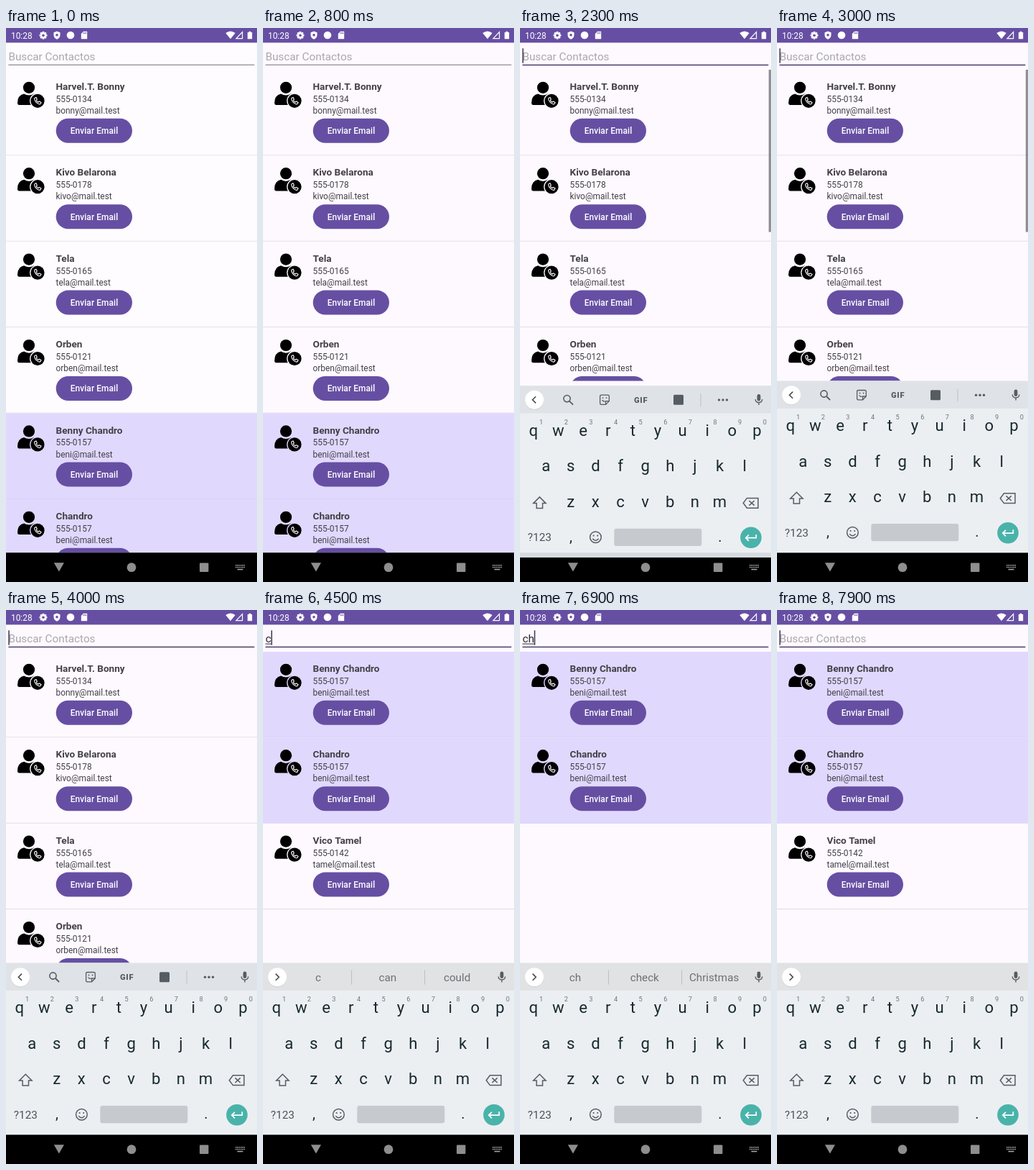
Animation, 350 px wide and 770 px high, one loop 8000 ms. Source, as an HTML page with a canvas:

```html
<!DOCTYPE html>
<html lang="es">
<head>
<meta charset="utf-8">
<title>Contactos</title>
<style>
html, body { margin: 0; width: 100%; height: 100%; overflow: hidden; background: #000; }
canvas { display: block; width: 350px; height: 770px; }
</style>
</head>
<body>
<canvas id="stage"></canvas>
<script>
const W = 350, H = 770, LOOP = 8000, TICK = 100;
const canvas = document.getElementById('stage');
const ratio = window.devicePixelRatio || 1;
canvas.width = W * ratio;
canvas.height = H * ratio;
const g = canvas.getContext('2d');

const PURPLE = '#664fa3', LAVENDER = '#e1d8fe', INK = '#434046', KEY = '#17292f', ICON = '#555c62';
const ROW = 119.4, LIST_TOP = 58, KB_TOP = 490.6, NAV_TOP = 729.2, RISE = 6.6;

const contacts = [
  ['Harvel.T. Bonny', '555-0134', 'bonny'],
  ['Kivo Belarona', '555-0178', 'kivo'],
  ['Tela', '555-0165', 'tela'],
  ['Orben', '555-0121', 'orben'],
  ['Benny Chandro', '555-0157', 'beni', true],
  ['Chandro', '555-0157', 'beni', true],
  ['Vico Tamel', '555-0142', 'tamel']
];

// Each edit restarts the caret blink; hints may follow a little later.
const edits = [
  { at: 2000, text: '', filter: '' },
  { at: 4500, text: 'c', filter: 'c' },
  { at: 4900, text: 'ch', filter: 'ch' },
  { at: 7300, text: 'c', filter: 'c' },
  { at: 7800, text: '', filter: 'c' }
];
const hints = [
  { at: 4500, words: ['c', 'can', 'could'] },
  { at: 4900, words: ['ch', 'check', 'Christmas'] },
  { at: 7400, words: ['c', 'can', 'could'] },
  { at: 7900, words: [] }
];
const latest = (list, t) => list.filter(e => e.at <= t).pop();

function rect(x, y, w, h, color) {
  g.fillStyle = color;
  g.fillRect(x, y, w, h);
}
function pill(x, y, w, h, r, color) {
  g.fillStyle = color;
  g.beginPath();
  g.roundRect(x, y, w, h, r);
  g.fill();
}
function disc(x, y, r, color) {
  g.fillStyle = color;
  g.beginPath();
  g.arc(x, y, r, 0, Math.PI * 2);
  g.fill();
}
function ring(x, y, r, color, width) {
  g.strokeStyle = color;
  g.lineWidth = width;
  g.beginPath();
  g.arc(x, y, r, 0, Math.PI * 2);
  g.stroke();
}
function fillPath(d, color) {
  g.fillStyle = color;
  g.fill(new Path2D(d));
}
function linePath(d, color, width) {
  g.strokeStyle = color;
  g.lineWidth = width;
  g.stroke(new Path2D(d));
}
function text(str, x, y, size, color, weight = 400, align = 'left') {
  g.font = `${weight} ${size}px Roboto, sans-serif`;
  g.textAlign = align;
  g.fillStyle = color;
  g.fillText(str, x, y);
}
function at(x, y, draw) {
  g.save();
  g.translate(x, y);
  draw();
  g.restore();
}

function statusBar() {
  rect(0, 0, W, 20.4, PURPLE);
  text('10:28', 7, 14.5, 11.9, '#fff');
  at(52, 10.2, () => {
    for (let i = 0; i < 8; i++) {
      g.rotate(Math.PI / 4);
      rect(-1.3, -5.4, 2.6, 3, '#fff');
    }
    disc(0, 0, 4.2, '#fff');
    disc(0, 0, 1.8, PURPLE);
  });
  fillPath('M71 4.5L75.5 6.3V10Q75.3 14 71 15.8Q66.7 14 66.5 10V6.3Z', '#fff');
  disc(71, 9.8, 1.8, PURPLE);
  disc(90, 10, 5.3, '#fff');
  fillPath('M108 4.8H113.2V15.2H104.8V8Z', '#fff');
  for (let i = 0; i < 3; i++) rect(107.6 + i * 1.8, 6, 0.9, 2.2, PURPLE);
  fillPath('M306.3 7Q313 1.8 319.7 7L313 15.3Z', '#fff');
  linePath('M321 14.6L329.6 5.6V14.6Z', '#fff', 1.2);
  fillPath('M336.8 6H338.6V4.8H341.4V6H343.2V15.3H336.8Z', '#fff');
}

function navIcons() {
  fillPath('M66.8 743.2H81L73.9 755.6Z', '#8e8e8e');
  disc(175, 749.7, 6.4, '#8e8e8e');
  pill(270, 743.6, 12.4, 12.4, 1, '#8e8e8e');
  for (let r = 0; r < 2; r++)
    for (let i = 0; i < 6; i++) rect(320 + i * 2.3, 746 + r * 2.8, 1.5, 1.5, '#aaa');
  rect(322.5, 751.8, 8, 1.5, '#aaa');
}

function person(bg) {
  disc(32, 24.8, 8.1, '#000');
  fillPath('M16 46Q16 35.5 25 33.4Q32 37.6 39 33.4Q47 35.5 48 44V49H18.5Q16 49 16 46Z', '#000');
  disc(44, 43.3, 10.9, bg);
  disc(44, 43.3, 9.6, '#000');
  linePath('M40.2 39.2L42 38.4L43.3 41.2L42.2 42.3Q43 44.3 45 45.2L46.2 44L49 45.4L48.2 47.2Q47.4 48.4 45.4 47.6Q41 45.6 39.7 41.2Q39.4 39.8 40.2 39.2Z', '#fff', 1.1);
}

function contactRow([name, phone, user, tinted], y, bg) {
  at(0, y, () => {
    const back = tinted ? LAVENDER : bg;
    rect(0, 0, W, ROW, back);
    rect(0, ROW - 1, W, 1, tinted ? 'rgba(0,0,0,.03)' : 'rgba(0,0,0,.13)');
    person(back);
    text(name, 69.5, 28, 13.6, INK, 700);
    text(phone, 69.5, 44.7, 11.92, INK);
    text(user + '@mail.test', 69.5, 60.9, 11.92, INK);
    pill(69.7, 67.8, 106.3, 34, 17, PURPLE);
    g.letterSpacing = '0.085px';
    text('Enviar Email', 123, 89.2, 11.92, '#fff', 500, 'center');
    g.letterSpacing = '0px';
  });
}

function contactList(filter, bottom, bg) {
  g.save();
  g.beginPath();
  g.rect(0, LIST_TOP, W, bottom - LIST_TOP);
  g.clip();
  contacts.filter(c => c[0].toLowerCase().includes(filter))
    .forEach((c, i) => contactRow(c, LIST_TOP + i * ROW, bg));
  g.restore();
}

function searchField(edit, t) {
  const hint = () => text('Buscar Contactos', 3.4, 45.2, 15.3, '#aaa7ad');
  if (!edit) {
    hint();
    rect(3.4, 50.7, 343, 1.1, '#7f7c84');
    return;
  }
  rect(3.4, 50.6, 343, 1.7, '#5b4e75');
  if (edit.text) {
    text(edit.text, 3.4, 45.2, 15.3, '#2a282d');
    rect(3.4, 46.6, g.measureText(edit.text).width, 1, '#2a282d');
  } else {
    hint();
  }
  if ((t - edit.at) % 1000 < 500)
    rect(3.3 + g.measureText(edit.text).width, 28.3, 1.5, 20.4, '#3d3551');
}

function microphone() {
  pill(330.6, 502.5, 4.8, 9.4, 2.4, ICON);
  linePath('M328.2 509.5Q328.6 514 333 514Q337.4 514 337.8 509.5M333 514V517.5', ICON, 1.4);
}

function toolStrip() {
  ring(65.5, 508.5, 4.6, ICON, 1.6);
  linePath('M69 512L74 517', ICON, 1.8);
  linePath('M113.5 503.5H122.5Q124.3 503.5 124.3 505.3V512L119.5 516.8H113.5Q111.6 516.8 111.6 515V505.3Q111.6 503.5 113.5 503.5ZM124.3 512H119.5V516.8M114.5 510.5Q116 513 118.5 512', ICON, 1.3);
  disc(115.5, 507.5, 0.9, ICON);
  disc(120.5, 507.5, 0.9, ICON);
  g.letterSpacing = '0.8px';
  text('GIF', 168.7, 514.2, 11.2, ICON, 900, 'center');
  g.letterSpacing = '0px';
  pill(214, 503.2, 14, 14, 1.5, ICON);
  rect(251.5, 501.5, 1, 18, '#bcc1c6');
  for (let i = -1; i < 2; i++) disc(283 + i * 5.5, 510.3, 1.7, ICON);
}

function hintStrip(words) {
  words.forEach((word, i) => text(word, 77 + i * 96.8, 516, 15.2, '#6b7075', 400, 'center'));
  if (words.length) [123, 225].forEach(x => rect(x, 500.5, 1, 20, '#bcc0c4'));
}

function letters(keys, x, y) {
  [...keys].forEach((k, i) => text(k, x + i * 34.62, y, 22.1, KEY, 400, 'center'));
}

function keyboard(shift, hint) {
  at(0, shift, () => {
    rect(0, KB_TOP, W, NAV_TOP - KB_TOP, '#eceff2');
    rect(0, KB_TOP, W, 38.2, hint ? '#e0e2e4' : '#dfe3e7');
    if (shift) rect(0, NAV_TOP - RISE, W, RISE, '#d8dce2');
    disc(20, 511, 13.2, 'rgba(0,0,0,.08)');
    disc(20, 510.2, 13, '#fff');
    linePath(hint ? 'M17.6 505.6L22.2 510.2L17.6 514.8' : 'M22 505.6L17.4 510.2L22 514.8', '#444a4f', 1.6);
    hint ? hintStrip(hint.words) : toolStrip();
    microphone();

    letters('qwertyuiop', 18.8, 560);
    [...'1234567890'].forEach((d, i) => text(d, 29.7 + i * 34.62, 544.1, 9.2, '#6b757b', 400, 'center'));
    letters('asdfghjkl', 36.2, 609.8);
    letters('zxcvbnm', 70.7, 659.3);

    linePath('M27.3 645.3L36 654H31.5V661H23.1V654H18.6Z', ICON, 1.5);
    linePath('M316.5 646.8H332V660.6H316.5L311.3 653.7ZM319.5 650.4L326.8 657M326.8 650.4L319.5 657', ICON, 1.5);
    text('?123', 10.8, 706.5, 15.3, '#4a5358');
    text(',', 71, 707, 20, KEY, 400, 'center');
    ring(105.4, 701.2, 7.8, ICON, 1.5);
    disc(102.6, 699, 1.1, ICON);
    disc(108.2, 699, 1.1, ICON);
    linePath('M101.2 703.1Q105.4 708.4 109.6 703.1', ICON, 1.5);
    pill(131.3, 689.1, 122, 24.2, 3, '#c6cace');
    text('.', 278.8, 707, 20, KEY, 400, 'center');
    disc(322, 701.7, 14.8, '#49b3aa');
    linePath('M329.3 697.3V702.1H315M319 697.9L314.8 702.1L319 706.3', '#fff', 1.7);
  });
}

function pageColor(t) {
  const p = Math.min(1, Math.max(0, (t - 100) / 800));
  return `rgb(254,${Math.round(252 - 3 * p)},255)`;
}

function draw(t) {
  g.setTransform(ratio, 0, 0, ratio, 0, 0);
  const edit = latest(edits, t);
  const typing = t >= 2300;
  const bg = pageColor(t);

  rect(0, 0, W, H, bg);
  statusBar();
  contactList(edit ? edit.filter : '', typing ? KB_TOP : NAV_TOP, bg);
  searchField(edit, t);

  if (typing) {
    const fade = Math.min(1, Math.max(0, (4000 - t) / 300));
    rect(346.8, LIST_TOP, 3.2, 225.5, `rgba(95,92,98,${0.68 * fade})`);
  }
  rect(0, NAV_TOP, W, H - NAV_TOP, '#000');
  if (typing) {
    const rest = Math.max(0, 1 - (t - 2300) / 200);
    keyboard(RISE * rest * rest, latest(hints, t));
  }
  navIcons();
}

const start = performance.now();
function loop(now) {
  const t = Math.max(0, now - start) % LOOP;
  draw(Math.floor(t / TICK) * TICK);
  requestAnimationFrame(loop);
}
draw(0);
requestAnimationFrame(loop);
</script>
</body>
</html>
```
